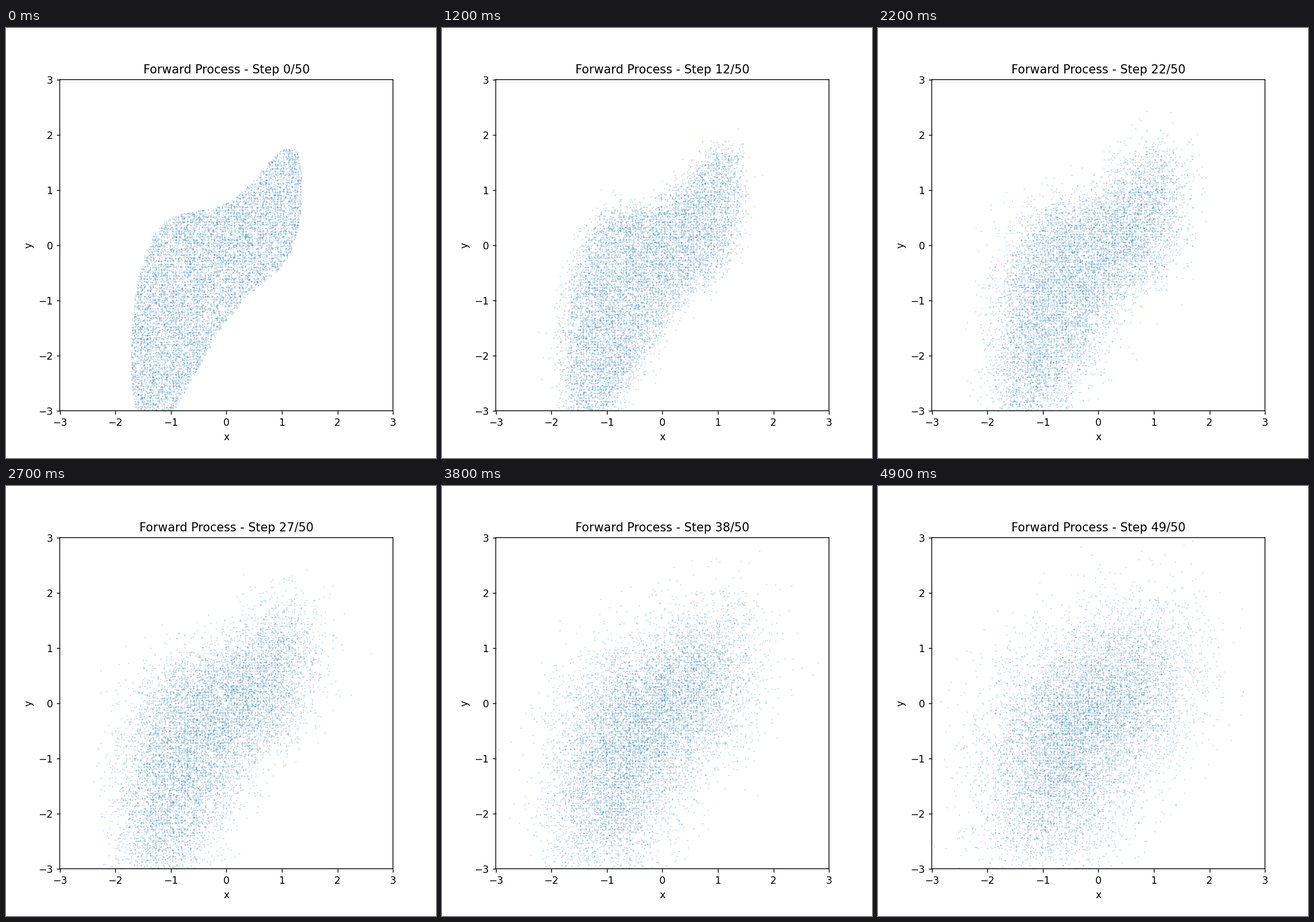
A matplotlib script for the animation above (5000 ms loop, 748 by 748 pixels).

```python
import numpy as np
import matplotlib.pyplot as plt
from matplotlib.animation import FuncAnimation

STEPS = 50
COUNT = 10000
LIMIT = 3
GRID = 2 * LIMIT / 465  # dots sit on a fine grid, so some coincide


def inside_blob(x, y):
    """Sheared ellipse with a narrow waist and a longer lower lobe."""
    u = (x + 0.18) / 1.54
    middle = -0.48 + 1.52 * u
    waist = 1.18 - 0.97 * u + 1.67 * u**2 + 0.46 * u**3
    half_height = waist * np.sqrt(np.clip(1 - u**2, 0, None))
    return np.abs(y - middle) < half_height


def sample_blob(rng):
    candidates = rng.uniform((-1.75, -4), (1.4, 2), (COUNT * 4, 2))
    return candidates[inside_blob(*candidates.T)][:COUNT]


def diffuse(start, rng):
    """Mix a little Gaussian noise into the points at every step."""
    states = [start]
    for beta in np.linspace(1e-4, 0.02, STEPS)[:-1]:
        noise = rng.standard_normal(start.shape)
        states.append(np.sqrt(1 - beta) * states[-1] + np.sqrt(beta) * noise)
    return states


rng = np.random.default_rng(7)
states = diffuse(sample_blob(rng), rng)

plt.rcParams.update({"font.family": "DejaVu Sans", "path.snap": False})
fig, ax = plt.subplots(figsize=(6, 6), dpi=124.667)
ax.set(xlim=(-LIMIT, LIMIT), ylim=(-LIMIT, LIMIT), xlabel="x", ylabel="y")
dots = ax.scatter([], [], s=1.6, alpha=0.3, linewidths=0, color="tab:blue")
title = ax.set_title("")


def update(step):
    dots.set_offsets(np.round(states[step] / GRID) * GRID)
    title.set_text(f"Forward Process - Step {step}/{STEPS}")
    return dots, title


animation = FuncAnimation(fig, update, frames=STEPS, interval=100, repeat_delay=0)
plt.show()
```
